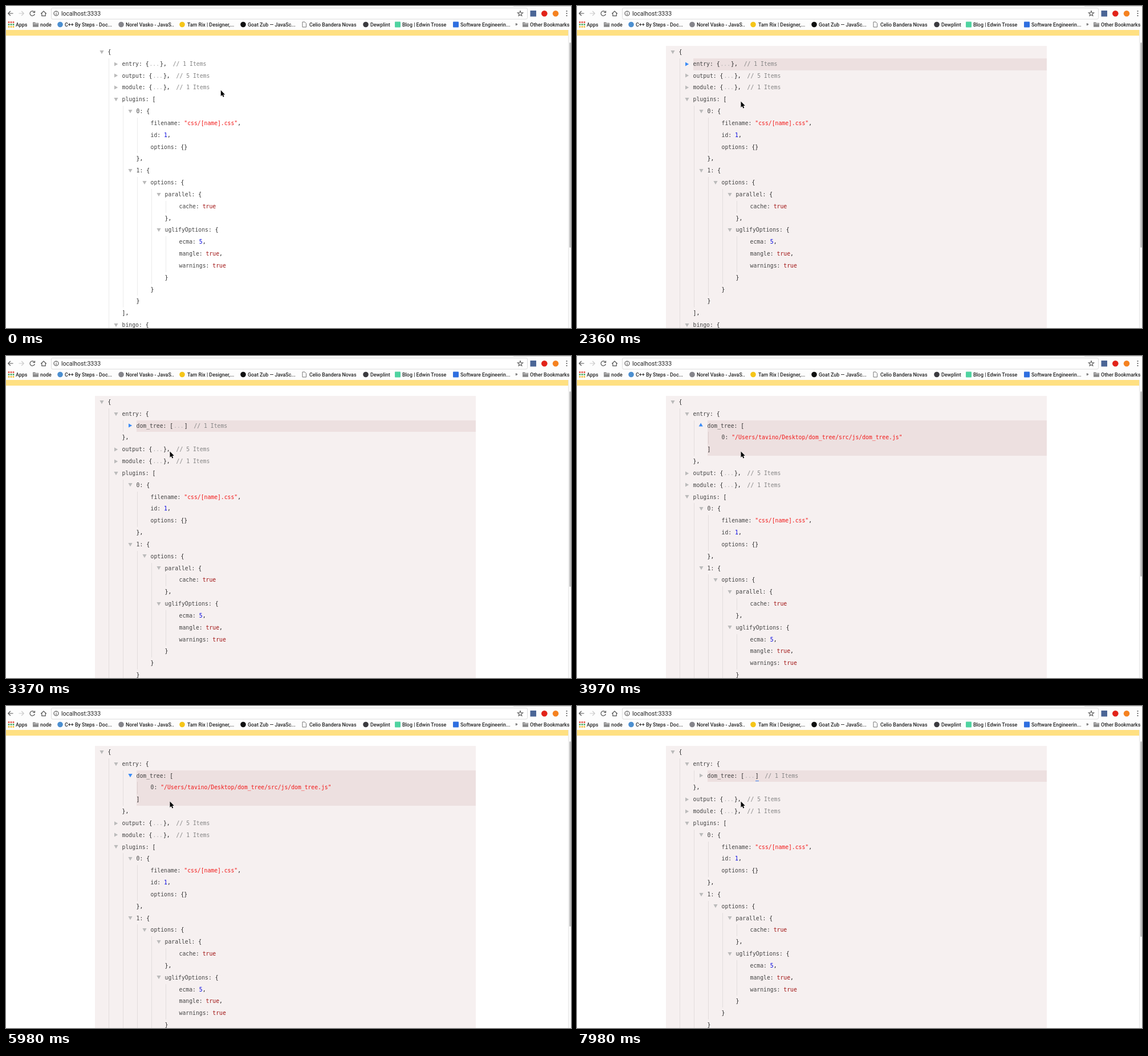
An HTML page for the animation above (8000 ms loop, 991 px wide and 565 px high).

```html
<!DOCTYPE html>
<html lang="en">
<head>
<meta charset="utf-8">
<title>Object tree viewer</title>
<style>
html, body { margin: 0; width: 100%; height: 100%; overflow: hidden; background: #fff; }
#stage { position: relative; width: 991px; height: 565px; overflow: hidden; }
#bar, #cursor { position: absolute; left: 0; top: 0; overflow: visible; }
#bar text { font: 500 8.9px Roboto, "Liberation Sans", sans-serif; fill: #222; }
#bar .url { font-size: 10.5px; font-weight: 400; }
#banner { position: absolute; top: 42px; width: 986px; height: 10px; background: #ffe082; }
#track { position: absolute; left: 986px; top: 42px; width: 5px; height: 523px; background: #fafafa; border-left: 1px solid #e6e6e6; box-sizing: border-box; }
#thumb { position: absolute; left: 988px; width: 3px; border-radius: 2px; background: #c1c1c1; }
#tree {
  position: absolute; left: 156px; top: 70px; width: 668px; height: 600px;
  padding: 1px 0 0 22.6px; box-sizing: border-box; white-space: pre; color: #222;
  font: 9.75px/20.84px "DejaVu Sans Mono", "Liberation Mono", monospace;
}
#tree.active { background: #f6f0f0; }
.node, .row { position: relative; }
.row { height: 20.84px; }
.node.picked { background: #ede0e0; }
.kids { margin-left: 1px; padding-left: 23px; border-left: 1px solid rgba(0, 0, 0, .08); }
.key { color: #444; }
.str { color: #f21818; }
.num { color: #0808e0; }
.bool { color: #a01212; }
.dots { color: #b4b4b4; padding: 0 .95px; }
.note { color: #868686; margin-left: 10.9px; }
.arrow { position: absolute; left: -16.1px; top: 4.7px; width: 10px; height: 10px; fill: #bbb; overflow: visible; }
.arrow.on { fill: #3b8cf7; }
.mark { position: relative; display: inline-block; }
.mark.on::after { content: ""; position: absolute; left: 0; right: 0; bottom: 1.2px; height: 1.8px; background: #3b82f0; }
</style>
</head>
<body>
<div id="stage">
  <svg id="bar" width="991" height="42"></svg>
  <div id="banner"></div>
  <div id="tree"></div>
  <div id="track"></div>
  <div id="thumb"></div>
  <svg id="cursor" width="10" height="14">
    <path d="M0 0V10.4L2.4 8.2 4 12 5.7 11.3 4.2 7.6H7.3Z" fill="#000" stroke="#fff" stroke-width="1" paint-order="stroke"/>
  </svg>
</div>
<script>
const LOOP = 8000;
const $ = id => document.getElementById(id);

// Browser bar
const icons = {
  dot: (x, c) => `<circle cx="${x}" cy="32.5" r="4.8" fill="${c}"/>`,
  box: (x, c) => `<rect x="${x - 5}" y="27.5" width="10" height="10" rx="1" fill="${c}"/>`,
  folder: x => `<path d="M${x - 5} 28.5h4l1 1.3h5v7h-10z" fill="#8a8a8a"/><path d="M${x - 4} 31.2h8" stroke="#ddd"/>`,
  page: x => `<path d="M${x - 3} 28h4l2.5 2.5v6.5h-6.5z" fill="#fff" stroke="#777"/>`,
  apps: x => ["#e5493a", "#3fa757", "#f2b92d"].map((c, r) => [-4, 0, 4].map(d =>
    `<rect x="${x + d - 1.3}" y="${27.2 + r * 4}" width="2.6" height="2.6" fill="${c}"/>`).join("")).join("")
};
const bookmarks = [
  ["apps", 9, "", 17, "Apps"],
  ["folder", 52, "", 60, "node"],
  ["dot", 95, "#4c8fd0", 103, "C++ By Steps - Doc..."],
  ["dot", 202, "#85858b", 210, "Norel Vasko - JavaS.."],
  ["dot", 309, "#f5c518", 318, "Tam Rix | Designer,..."],
  ["dot", 416, "#111", 424, "Goat Zub — JavaSc..."],
  ["page", 523, "", 532, "Celio Bandera Novas"],
  ["dot", 631, "#3b3b3f", 639, "Dewplint"],
  ["box", 687, "#4fd3a0", 695, "Blog | Edwin Trosse"],
  ["box", 789, "#2f6fe0", 797, "Software Engineerin..."],
  ["folder", 911, "", 919, "Other Bookmarks"]
];
const line = (d, color = "#555") => `<path d="${d}" fill="none" stroke="${color}" stroke-width="1.2"/>`;
const starPath = Array.from({ length: 10 }, (_, i) => {
  const a = i * Math.PI / 5 - Math.PI / 2, r = i % 2 ? 2.1 : 4.8;
  return (902 + r * Math.cos(a)).toFixed(1) + " " + (13.4 + r * Math.sin(a)).toFixed(1);
}).join("L");

$("bar").innerHTML =
  `<rect width="991" height="42" fill="#fdfdfd"/><path d="M890 .4H991" stroke="#ccc" stroke-width=".8"/>
  <rect x="79.5" y="3.5" width="835" height="19.5" rx="2.5" fill="#fff" stroke="#dcdcdc"/>` +
  line("M12.5 13H3.8M7.8 9L3.8 13 7.8 17") +
  line("M22.5 13H31.2M27.2 9L31.2 13 27.2 17", "#ccc") +
  line("M49.6 10.5A4.2 4.2 0 1 0 50.3 14M50.5 8.5V11.5H47") +
  line("M61.3 13.5L66 9 70.7 13.5M62.8 12.5V17.3H69.2V12.5") +
  line("M88 12.5V15.8M88 10V11.2") + line("M92 13A4 4 0 1 0 84 13 4 4 0 1 0 92 13") +
  line(`M${starPath}Z`, "#666") +
  `<text class="url" x="97" y="16.8">localhost:3333</text>
  <rect x="919.5" y="8" width="10.5" height="10.5" fill="#4a6596"/>
  <circle cx="944.3" cy="13.3" r="5.3" fill="#e2231a"/>
  <circle cx="964" cy="13.3" r="5.2" fill="#f58220"/>` +
  [9, 13, 17].map(y => `<circle cx="983.5" cy="${y}" r="1.1" fill="#555"/>`).join("") +
  `<text x="893" y="35">»</text>` +
  bookmarks.map(([icon, ix, color, x, label]) =>
    icons[icon](ix, color) + `<text x="${x}" y="35.7">${label}</text>`).join("");

// Object tree
const folded = count => ({ folded: count });
const data = {
  entry: { dom_tree: ["/Users/tavino/Desktop/dom_tree/src/js/dom_tree.js"] },
  output: folded(5),
  module: folded(1),
  plugins: [
    { filename: "css/[name].css", id: 1, options: {} },
    { options: { parallel: { cache: true }, uglifyOptions: { ecma: 5, mangle: true, warnings: true } } }
  ],
  bingo: { ready: true }
};
const span = (cls, text) => `<span class="${cls}">${text}</span>`;
const row = html => `<div class="row">${html}</div>`;
const kinds = { string: "str", number: "num", boolean: "bool" };

function render(value, key, comma, state) {
  const label = key === "" ? "" : span("key", key + ": ");
  const kind = kinds[typeof value];
  if (kind) return row(label + span(kind, JSON.stringify(value)) + comma);
  const list = Array.isArray(value), names = Object.keys(value);
  if (!names.length) return row(label + "{}" + comma);

  const picked = key === state.node;
  const lit = part => picked && state.part === part ? " on" : "";
  const mark = (part, text) => span("mark" + lit(part), text);
  const open = mark("open", list ? "[" : "{");
  const close = mark("close", list ? "]" : "}") + comma;
  const shut = value.folded || state.shut.includes(key);
  const angle = picked && state.angle !== undefined ? state.angle : shut ? -90 : 0;
  const arrow = `<svg class="arrow${lit("arrow")}" viewBox="-5 -5 10 10"><path d="M-3.6 -3H3.6L0 3.2Z" transform="rotate(${angle})"/></svg>`;
  const body = shut
    ? row(arrow + label + open + span("dots", "...") + close + span("note", `// ${value.folded || names.length} Items`))
    : row(arrow + label + open) +
      `<div class="kids">${names.map((name, i) =>
        render(value[name], name, i < names.length - 1 ? "," : "", state)).join("")}</div>` +
      row(close);
  return `<div class="node${picked ? " picked" : ""}">${body}</div>`;
}

// Timeline: start, cursor, focused node and part, folded nodes, arrow angle while turning
const START = [376.8, 147.8], PASS = [349.5, 156.5], REST = [287.5, 167.5];
const BOTH = ["entry", "dom_tree"], INNER = ["dom_tree"];
const step = (at, pos, node, part, shut, angle) => ({ at, pos, node, part, shut, angle });
const steps = [
  step(0, START, null, "", BOTH),
  step(750, PASS, null, "", BOTH),
  step(980, REST, null, "", BOTH),
  step(1130, REST, "entry", "arrow", BOTH),
  step(2830, REST, "entry", "arrow", INNER, -60),
  step(3010, REST, "entry", "arrow", INNER),
  step(3370, REST, "dom_tree", "arrow", INNER),
  step(3970, REST, "dom_tree", "arrow", [], -60),
  step(4120, REST, "dom_tree", "arrow", []),
  step(4480, REST, "dom_tree", "open", []),
  step(4780, REST, "dom_tree", "close", []),
  step(5830, REST, "dom_tree", "open", []),
  step(5980, REST, "dom_tree", "arrow", []),
  step(6420, REST, "dom_tree", "arrow", INNER, -13),
  step(6570, REST, "dom_tree", "arrow", INNER),
  step(7080, REST, "dom_tree", "open", INNER),
  step(7980, REST, "dom_tree", "close", INNER)
];
const thumbs = [[62, 387], [62, 405], [64, 424]];

let shown;
function show(state) {
  if (state === shown) return;
  shown = state;
  $("tree").className = state.node ? "active" : "";
  $("tree").innerHTML = render(data, "", "", state);
  const [top, bottom] = thumbs[state.shut.length];
  $("thumb").style.top = top + "px";
  $("thumb").style.height = bottom - top + "px";
  $("cursor").style.transform = `translate(${state.pos[0]}px, ${state.pos[1]}px)`;
}
const begin = performance.now();
function tick() {
  const t = (performance.now() - begin) % LOOP;
  show(steps.filter(s => s.at <= t).pop());
  requestAnimationFrame(tick);
}
tick();
</script>
</body>
</html>
```
